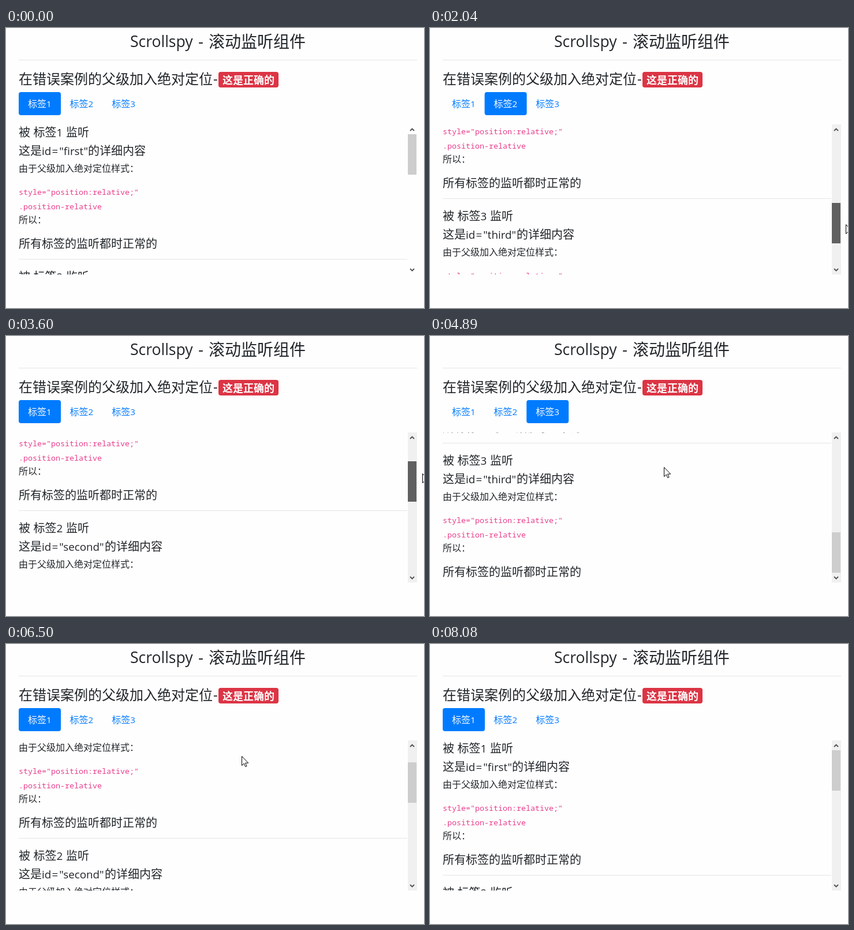
An HTML page for the animation above (8360 ms loop, 724 by 485 pixels).

```html
<!DOCTYPE html>
<html lang="zh-CN">
<head>
<meta charset="utf-8">
<title>Scrollspy</title>
<style>
html, body { margin: 0; width: 100%; height: 100%; overflow: hidden; background: #fefefe; }
svg { display: block; width: 724px; height: 485px; }
text { font-family: "Noto Sans CJK SC", "Noto Sans CJK", "Noto Sans CJK JP", sans-serif; fill: #212529; white-space: pre; }
text.lat { font-family: "Open Sans", "Noto Sans", sans-serif; }
text.code { font-family: "Noto Sans Mono", "DejaVu Sans Mono", monospace; fill: #e83e8c; }
</style>
</head>
<body>
<svg id="stage" viewBox="0 0 724 485" lang="zh-CN">
  <defs><clipPath id="view"><rect x="0" y="167" width="696" height="260"/></clipPath></defs>
</svg>
<script>
const LOOP = 8360, MAX_SCROLL = 465, THUMB_TRAVEL = 156, SECTION = 250;
const stage = document.getElementById('stage');

function add(parent, tag, attrs, content) {
  const el = document.createElementNS('http://www.w3.org/2000/svg', tag);
  for (const k in attrs) el.setAttribute(k, attrs[k]);
  if (content) el.textContent = content;
  parent.appendChild(el);
  return el;
}
const rect = (p, x, y, width, height, fill, rx = 0) => add(p, 'rect', { x, y, width, height, fill, rx });
const han = (p, x, y, size, s) => add(p, 'text', { x, y, 'font-size': size }, s);
const latin = (p, x, y, size, s) => add(p, 'text', { x, y, 'font-size': size, class: 'lat' }, s);
const code = (p, y, s) => add(p, 'text', { x: 22, y, 'font-size': 13.33, class: 'code' }, s);
const show = (el, on) => el.setAttribute('visibility', on ? 'visible' : 'hidden');

// Page header
latin(stage, 215, 33, 26.5, 'Scrollspy');
latin(stage, 333, 33, 28, '-');
han(stage, 351, 34, 28, '滚动监听组件');
rect(stage, 22, 55, 690, 1, '#e5e5e5');
han(stage, 22, 97, 24, '在错误案例的父级加入绝对定位');
latin(stage, 359, 97, 24, '-');
rect(stage, 368, 76, 104, 27, '#dc3545', 4);
const badge = han(stage, 375, 96.5, 18, '这是正确的');
badge.style.fill = '#fff';
badge.style.fontWeight = 700;

// Tabs
const tabs = [0, 1, 2].map(i => {
  const x = 22 + i * 72.6;
  return {
    pill: rect(stage, x, 111, 73, 40, '#007bff', 4),
    parts: [han(stage, x + 16, 137, 16, '标签'), latin(stage, x + 48, 137, 15.2, String(i + 1))]
  };
});

// Scrolled content
const view = add(stage, 'g', { 'clip-path': 'url(#view)' });
const content = add(view, 'g', {});
[['first', 142], ['second', 171], ['third', 150]].forEach(([id, end], i) => {
  const g = add(content, 'g', { transform: `translate(0 ${i * SECTION})` });
  han(g, 22, 187.5, 20, '被');
  han(g, 47.5, 187.5, 20, '标签');
  latin(g, 87.5, 187.5, 18.8, String(i + 1));
  han(g, 104, 187.5, 20, '监听');
  han(g, 22, 219.5, 20, '这是');
  latin(g, 62, 219.5, 18.8, 'id');
  latin(g, 79.5, 219.5, 18.8, '=');
  latin(g, 92.3, 219.5, 18.8, `"${id}"`);
  han(g, end, 219.5, 20, '的详细内容');
  han(g, 22, 249, 16, '由于父级加入绝对定位样式：');
  code(g, 289, 'style="position:relative;"');
  code(g, 314, '.position-relative');
  han(g, 22, 338, 16, '所以：');
  han(g, 22, 380.5, 20, '所有标签的监听都时正常的');
  if (i < 2) rect(g, 22, 400, 673, 1, '#e5e5e5');
});

// Scrollbar
const track = rect(stage, 696, 167, 16, 260, '#f0f0f0');
const patch = rect(stage, 696, 254, 12, 27, '#f0f0f0');
const thumb = rect(stage, 696, 184, 15, 70, '#cdcdcd');
for (const d of ['M700 178l3.5-3.5 3.5 3.5', 'M700 417l3.5 3.5 3.5-3.5'])
  add(stage, 'path', { d, fill: 'none', stroke: '#505050', 'stroke-width': 1.9 });

const pointer = add(stage, 'path', {
  d: 'M.5.5V16.5L4.2 13L6.7 18.6L9 17.6L6.6 12.1H11.7Z',
  fill: '#fff', stroke: '#000', 'stroke-width': 1
});

// Bursts of visible updates: start, end, count
const bursts = [
  [300, 1230, 8], [1380, 2040, 6], [2190, 2340, 2], [3020, 3600, 5], [3720, 3960, 3],
  [4080, 4890, 7], [5290, 5800, 5], [6110, 6500, 4], [6650, 6920, 3], [7170, 7440, 3], [7720, 8080, 4]
];
const ticks = [0];
for (const [a, b, n] of bursts)
  for (let i = 0; i < n; i++) ticks.push(Math.round(a + (b - a) * i / (n - 1)));

// time, scroll, pointer x, pointer y
const keys = [
  [0, 0, 530, 600], [300, 0, 536, 466], [831, 0, 697, 258], [964, 0, 708, 225], [1230, 0, 703, 215],
  [1380, 20, 705, 224], [2040, 355, 720, 340], [2340, 465, 722, 382], [3020, 440, 722, 370],
  [3600, 98, 721, 238], [3840, 0, 720, 205], [3960, 0, 718, 203], [4080, 45, 718, 222],
  [4620, 465, 716, 376], [4890, 465, 405, 227], [5290, 440, 405, 227], [5800, 65, 405, 227],
  [6110, 65, 405, 219], [6500, 64, 408, 194], [6650, 140, 407, 196], [6920, 365, 404, 201],
  [7170, 290, 403, 201], [7440, 0, 403, 201], [7720, 0, 430, 225], [7960, 0, 700, 452],
  [8080, 0, 720, 600], [LOOP, 0, 720, 600]
];

function poseAt(t) {
  let i = 0;
  while (i < keys.length - 2 && keys[i + 1][0] <= t) i++;
  const a = keys[i], b = keys[i + 1], k = (t - a[0]) / (b[0] - a[0]);
  return a.map((v, j) => v + (b[j] - v) * k);
}

function thumbColor(t) {
  if (t >= 1230 && t < 4755) return '#606060';
  return t >= 964 && t < 1230 ? '#a8a8a8' : '#cdcdcd';
}

function draw(time) {
  let t = 0;
  for (const tick of ticks) if (tick <= time) t = tick;
  const [, scroll, x, y] = poseAt(t);
  const active = scroll >= MAX_SCROLL ? 2 : scroll >= SECTION - 10 ? 1 : 0;
  tabs.forEach((tab, i) => {
    show(tab.pill, i === active);
    for (const el of tab.parts) el.style.fill = i === active ? '#fff' : '#007bff';
  });
  content.setAttribute('transform', `translate(0 ${-Math.round(scroll)})`);
  thumb.setAttribute('y', 184 + Math.round(scroll * THUMB_TRAVEL / MAX_SCROLL));
  thumb.setAttribute('fill', thumbColor(t));
  show(track, t >= 1380);
  show(patch, t >= 831 && t < 1380);
  pointer.setAttribute('transform', `translate(${Math.round(x)} ${Math.round(y)})`);
}

const start = performance.now();
function loop() {
  draw((performance.now() - start) % LOOP);
  requestAnimationFrame(loop);
}
loop();
</script>
</body>
</html>
```
